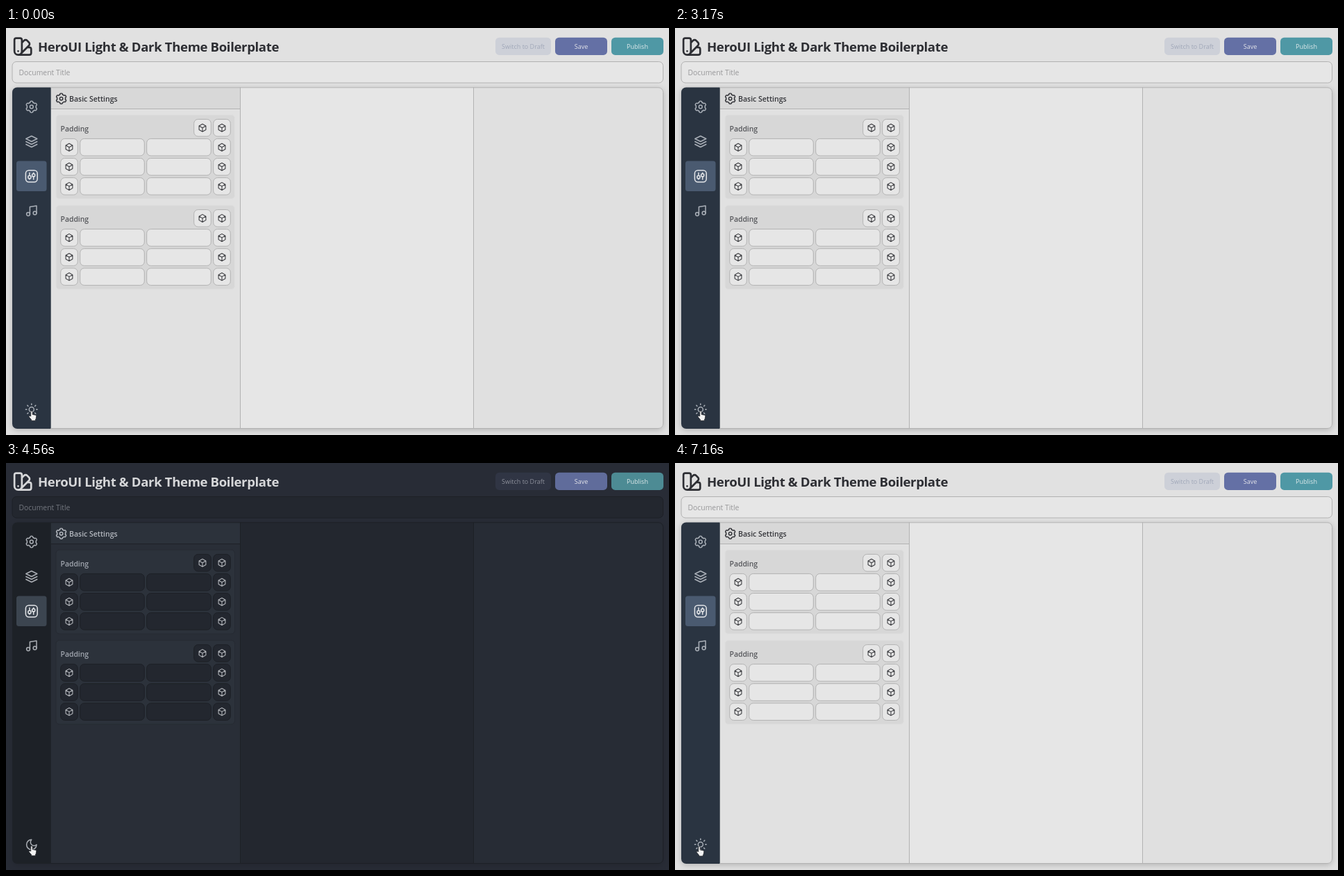
An HTML page that plays this animation: 955 by 586 pixels, repeating every 7.3 s.

```html
<!DOCTYPE html>
<html lang="en">
<head>
<meta charset="utf-8">
<title>Theme switch</title>
<style>
html, body { margin: 0; width: 100%; height: 100%; overflow: hidden; }
svg { display: block; width: 955px; height: 586px; background: var(--page); }
.light {
  --page: #e1e1e1; --field: #e6e6e6; --edge: #b2b2b2; --side: #2a3441; --tile: #4a5a70;
  --panel: #e1e1e1; --head: #d8d8d8; --group: #d7d7d7; --rim: #dfdfdf; --mid: #e6e6e6; --right: #e0e0e0;
  --title: #2d2e33; --text: #55565a; --strong: #333439; --hint: #98989a; --icon: #3c3d41; --nav: #a9afb7;
  --draft: #cdd0d8; --draftText: #a1a8b9; --save: #6470a5; --publish: #4f98a5; --shadow: #0003;
}
.dark {
  --page: #282c36; --field: #23272f; --edge: #1d2026; --side: #1d2127; --tile: #3c4550;
  --panel: #292e37; --head: #2c323b; --group: #2c323b; --rim: #262a32; --mid: #23272f; --right: #272c35;
  --title: #d6d7d9; --text: #a2a7b0; --strong: #b4b8bf; --hint: #73777f; --icon: #b3b6bb; --nav: #a9adb3;
  --draft: #303544; --draftText: #8d909b; --save: #606c9b; --publish: #4d8b94; --shadow: #0002;
}
text { font-family: "Open Sans", "Noto Sans", sans-serif; }
.icon { fill: none; stroke-linecap: round; stroke-linejoin: round; }
.light .moon, .dark .sun { display: none; }
</style>
</head>
<body>
<svg id="stage" class="light" viewBox="0 0 955 586"></svg>
<script>
const stage = document.getElementById('stage');
const LOOP = 7300, TO_DARK = 3970, TO_LIGHT = 6880;

const box = (x, y, w, h, fill, r = 0, edge = '') =>
  `<rect x="${x}" y="${y}" width="${w}" height="${h}" rx="${r}" style="fill:var(--${fill});` +
  `${edge && `stroke:var(--${edge})`}"/>`;

const label = (x, y, size, color, words, weight = 400, extra = '') =>
  `<text x="${x}" y="${y}" font-size="${size}" font-weight="${weight}" fill="${color}" ${extra}>${words}</text>`;

// Icons live on a 24-unit grid and are placed by their centre.
const icon = (shape, x, y, scale, color, width = 2, cls = '') =>
  `<g class="icon ${cls}" transform="translate(${x} ${y}) scale(${scale}) translate(-12 -12)" ` +
  `style="stroke:${color};stroke-width:${width}">${shape}</g>`;

const path = d => `<path d="${d}"/>`;
const ring = (x, y, r) => `<circle cx="${x}" cy="${y}" r="${r}"/>`;
const polar = (r, deg) => {
  const a = deg * Math.PI / 180;
  return [12 + r * Math.cos(a), 12 + r * Math.sin(a)];
};

function gear() {
  const pts = [];
  for (let a = -90; a < 270; a += 60)
    pts.push(polar(10.5, a - 13), polar(10.5, a + 13), polar(7.6, a + 18), polar(8.6, a + 30), polar(7.6, a + 42));
  const half = i => {
    const p = pts[i % pts.length], q = pts[(i + 1) % pts.length];
    return `${(p[0] + q[0]) / 2} ${(p[1] + q[1]) / 2}`;
  };
  let d = 'M' + half(pts.length - 1);
  pts.forEach((p, i) => d += `Q${p.join(' ')} ${half(i)}`);
  return path(d + 'Z') + ring(12, 12, 3);
}

function sun() {
  let d = '';
  for (let a = 0; a < 360; a += 45) d += `M${polar(8.6, a)}L${polar(10.5, a)}`;
  return ring(12, 12, 4.4) + path(d);
}

const shapes = {
  gear: gear(),
  sun: sun(),
  moon: path('M12 3a6 6 0 0 0 9 9 9 9 0 1 1-9-9Z'),
  cube: path('M12 2.3l8.6 4.9v9.6L12 21.7l-8.6-4.9V7.2ZM3.6 7.2L12 12l8.4-4.8M12 21.5V12'),
  layers: path('M12 2L2 7l10 5 10-5ZM2 12l10 5 10-5M2 17l10 5 10-5'),
  sliders: '<rect x="1.5" y="1.5" width="21" height="21" rx="5.5"/>' +
    path('M8.4 6v5M8.4 16.4V18M15.6 6v1.6M15.6 13v5') + ring(8.4, 13.7, 2.6) + ring(15.6, 10.3, 2.6),
  music: path('M9 18V5l12-2v13') + ring(6, 18, 3) + ring(18, 16, 3),
  swatch: path('M11 17a4 4 0 0 1-8 0V5a2 2 0 0 1 2-2h4a2 2 0 0 1 2 2ZM16.7 13H19a2 2 0 0 1 2 2v4a2 2 0 0 1-2 2H7M7 17h.01' +
    'M11 8l2.3-2.3a2.4 2.4 0 0 1 3.4 0L18.6 7.6a2.4 2.4 0 0 1 0 3.4L9.9 19.8')
};

const cubeButton = (x, y) =>
  box(x, y, 24.6, 24.6, 'field', 6, 'edge') + icon(shapes.cube, x + 12.3, y + 12.3, .57, 'var(--icon)', 1.9);

function group(y) {
  let s = box(72, y, 257.5, 121, 'group', 5, 'rim') +
    label(78.5, y + 23.5, 10.4, 'var(--text)', 'Padding', 600) +
    cubeButton(270.7, y + 6.4) + cubeButton(298.7, y + 6.4);
  for (let i = 0; i < 3; i++) {
    const top = y + 34.4 + i * 28.1;
    s += cubeButton(78.7, top) + box(106.7, top, 92.6, 24.6, 'field', 6, 'edge') +
      box(202.7, top, 92.6, 24.6, 'field', 6, 'edge') + cubeButton(298.7, top);
  }
  return s;
}

const button = (x, w, fill, color, words) =>
  box(x, 13.7, w, 25.2, fill, 5.5) +
  label(x + w / 2, 29.9, 9, color, words, 400, 'text-anchor="middle"');

const nav = (name, y, color = 'var(--nav)', cls = '') => icon(shapes[name], 36.8, y, .8, color, 1.9, cls);

stage.innerHTML =
  '<defs><clipPath id="card"><rect x="9" y="85.5" width="938" height="491.5" rx="7"/></clipPath></defs>' +
  icon(shapes.swatch, 24.2, 26.6, 1.34, 'var(--title)') +
  label(46, 33.6, 18.6, 'var(--title)', 'HeroUI Light &amp; Dark Theme Boilerplate', 700, 'letter-spacing="-.02em"') +
  button(705, 80, 'draft', 'var(--draftText)', 'Switch to Draft') +
  button(791, 75, 'save', '#e2e3e9', 'Save') +
  button(872, 75, 'publish', '#e0eaec', 'Publish') +
  box(9, 48.5, 937.5, 30.5, 'field', 6, 'edge') +
  label(18.5, 68.4, 10.4, 'var(--hint)', 'Document Title') +
  '<g style="filter:drop-shadow(0 2px 4px var(--shadow))">' + box(9, 85.5, 938, 491.5, 'right', 7) + '</g>' +
  '<g clip-path="url(#card)">' +
  box(64.5, 85, 273, 493, 'panel') + box(64.5, 85, 273, 31.5, 'head') + box(65, 116, 272, 1, 'edge') +
  box(338, 85, 335, 493, 'mid') + box(337, 85, 1, 493, 'edge') + box(673, 85, 1, 493, 'edge') +
  box(9, 85, 55.7, 493, 'side') + '</g>' +
  '<path d="M64.5 85.8H940a6.5 6.5 0 0 1 6.5 6.5V570a6.5 6.5 0 0 1-6.5 6.5H64.5" style="fill:none;stroke:var(--edge)"/>' +
  icon(shapes.gear, 79.6, 101.7, .74, 'var(--strong)', 2) +
  label(91, 105.8, 10.5, 'var(--strong)', 'Basic Settings', 600) +
  group(125) + group(255.2) +
  box(15, 191.5, 43.5, 43.5, 'tile', 3.5) +
  nav('gear', 113.5) + nav('layers', 163.5) + nav('sliders', 213.3, '#e2e4e7') + nav('music', 263.2) +
  nav('sun', 549.3, 'var(--nav)', 'sun') + nav('moon', 549.5, 'var(--nav)', 'moon') +
  '<path id="hand" fill="#f2f2f2" stroke="#25282c" stroke-width=".8" stroke-linejoin="round" ' +
  'd="M-1.3 7.4V1a1.25 1.25 0 0 1 2.5 0V4.8l4.3 .9a1.6 1.6 0 0 1 1.3 1.8l-.6 3.4-.9 1.6v1.3H-.4v-1.3L-3.6 8.6a1 1 0 0 1 1.4-1.5Z"/>';

const hand = document.getElementById('hand');

function draw(now) {
  const t = now % LOOP;
  stage.setAttribute('class', t >= TO_DARK && t < TO_LIGHT ? 'dark' : 'light');
  hand.setAttribute('transform', t < TO_LIGHT ? 'translate(37 551.6)' : 'translate(35 552.2)');
  requestAnimationFrame(() => draw(performance.now() - start));
}
const start = performance.now();
draw(0);
</script>
</body>
</html>
```
